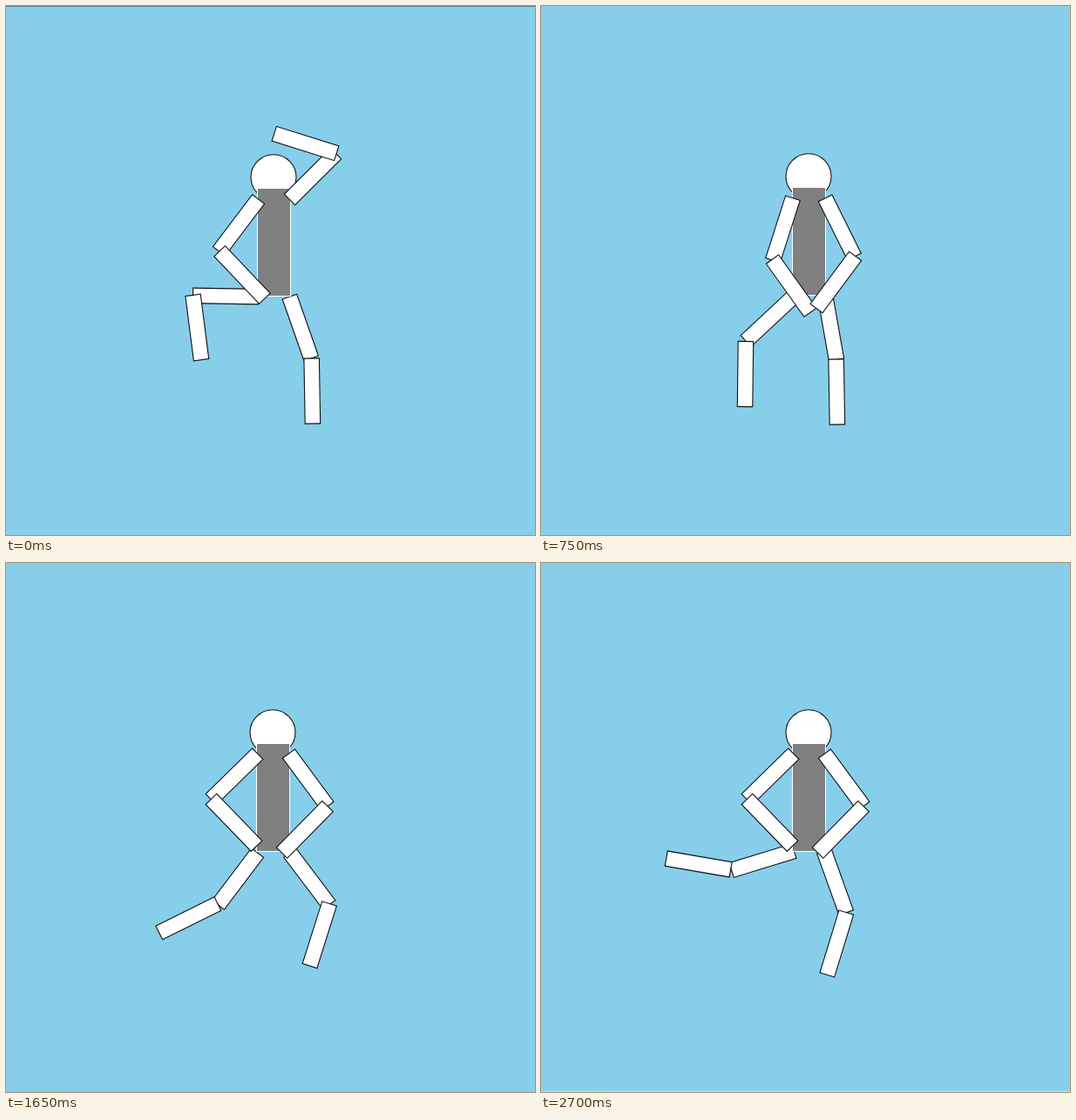
Animation of 607 by 608 pixels, one loop 2.85 s. Source, as an HTML page with a canvas:

```html
<!DOCTYPE html>
<html lang="en">
<head>
<meta charset="utf-8">
<title>Dancing figure</title>
<style>
html, body { margin: 0; width: 100%; height: 100%; overflow: hidden; background: #87ceeb; }
canvas { display: block; }
</style>
</head>
<body>
<canvas id="stage" width="607" height="608"></canvas>
<script>
const ctx = document.getElementById('stage').getContext('2d');
const STEP = 150;
const SKY = '#87ceeb';

// Each limb is [centre x, centre y, angle]; upper part first, lower part second.
const leftArm = {
  hip: [[267, 252, -53], [271, 309, 46.5]],
  low: [[277.5, 257.5, -72.3], [287.3, 322.7, 54.5]],
  wide: [[263, 247.5, -44.5], [262.5, 300.3, 46]]
};
const rightArm = {
  raised: [[352, 196, -45], [343.5, 158, 17.5]],
  low: [[342.8, 255.5, 63.6], [338.3, 318.5, -53.5]],
  wide: [[347.7, 251.3, 53.6], [343.8, 308.3, -45.5]]
};
const leftLeg = {
  lifted: [[252, 333.5, 1], [219.3, 369.5, 82.7]],
  down: [[271.5, 367.5, -62], [252.8, 438, 90.7]],
  bent: [[262.5, 360.5, -43], [234.5, 424, 90.7]],
  kicked: [[254.5, 344, -17], [180.7, 348, 9.8]],
  back: [[267, 365, -53], [210.3, 410.3, -26.4]]
};
const rightLeg = {
  down: [[337.8, 369.5, 70.7], [351.3, 442.5, 89]],
  lifted: [[361.5, 345, 17.3], [386.9, 391.8, -73.9]],
  straight: [[332.5, 370.5, 80], [339.3, 444.5, 89]],
  push: [[337.5, 368.5, 70.3], [339.3, 439.5, -73]],
  front: [[349.3, 365, 53], [360.8, 429.3, -72.5]]
};

const pose = (armL, armR, legL, legR, x, y, edge) => ({
  arms: [leftArm[armL], rightArm[armR]],
  legs: [leftLeg[legL], rightLeg[legR]],
  x, y, edge
});
const hop = (x, y) => pose('hip', 'raised', 'lifted', 'down', x, y, 'top');
const swap = pose('hip', 'raised', 'down', 'lifted', -2.5, -2.5);
const crouch = pose('low', 'low', 'bent', 'straight', 0, -1);
const step = pose('low', 'low', 'lifted', 'straight', 0, 1);
const kick = pose('wide', 'wide', 'kicked', 'push', 0, -2, 'bottom');
const run = pose('wide', 'wide', 'back', 'front', -1, -2);
const land = pose('wide', 'wide', 'back', 'straight', -1, -2);

const dance = [
  hop(0, 0), swap, hop(-2.5, -3.5), swap, hop(0, -1.5),
  crouch, step, crouch,
  land, kick, land, run, run, kick, run, land, kick, run, kick
];

function drawLimb([x, y, angle]) {
  ctx.save();
  ctx.translate(x, y);
  ctx.rotate(angle * Math.PI / 180);
  ctx.beginPath();
  ctx.rect(-37.5, -8.75, 75, 17.5);
  ctx.fill();
  ctx.stroke();
  ctx.restore();
}

function drawBody() {
  ctx.beginPath();
  ctx.arc(307, 196.7, 26, 0, 7);
  ctx.fill();
  ctx.stroke();
  ctx.fillRect(288, 210, 39, 124);
  ctx.fillStyle = '#808080';
  ctx.fillRect(289, 210, 37, 123);
  ctx.fillStyle = '#fff';
}

function draw(p) {
  ctx.fillStyle = SKY;
  ctx.fillRect(0, 0, 607, 608);
  if (p.edge) {
    ctx.fillStyle = p.edge === 'top' ? '#587f8d' : '#c3e6f5';
    ctx.fillRect(0, p.edge === 'top' ? 0 : 607, 607, 1);
  }
  ctx.save();
  ctx.translate(p.x, p.y);
  ctx.fillStyle = '#fff';
  ctx.strokeStyle = '#111';
  ctx.lineWidth = 1.1;
  p.legs.flat().forEach(drawLimb);
  drawBody();
  p.arms.flat().forEach(drawLimb);
  ctx.restore();
}

const start = performance.now();
function tick() {
  const n = Math.floor((performance.now() - start) / STEP);
  draw(dance[n % dance.length]);
  requestAnimationFrame(tick);
}
tick();
</script>
</body>
</html>
```
